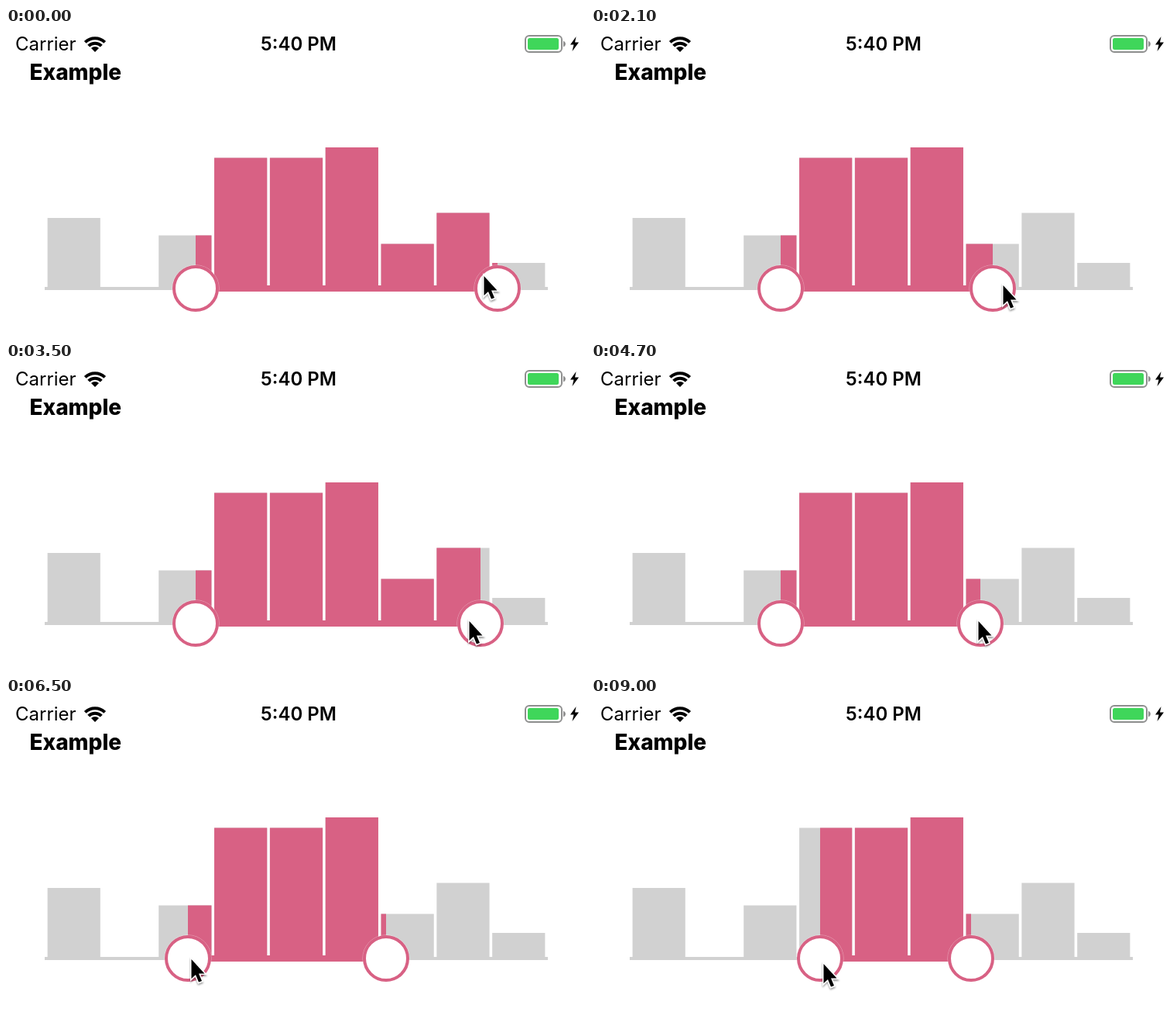
Animation, 748 px wide and 396 px high, one loop 9.1 s. Source, as an HTML page:

```html
<!DOCTYPE html>
<html lang="en">
<head>
<meta charset="utf-8">
<title>Range slider with histogram</title>
<style>
  html, body { margin: 0; width: 100%; height: 100%; overflow: hidden; background: #fff; }
  svg { display: block; width: 100vw; height: 100vh; }
  text { font-family: Inter, "Liberation Sans", sans-serif; fill: #000; }
</style>
</head>
<body>
<svg viewBox="0 0 748 396">
  <defs>
    <clipPath id="range"><rect id="window" y="100" height="260"/></clipPath>
    <filter id="shadow" x="-50%" y="-50%" width="200%" height="200%">
      <feDropShadow dx="0" dy="2" stdDeviation="1.3" flood-color="#000" flood-opacity=".4"/>
    </filter>
    <g id="handle">
      <circle r="30.2" fill="none" stroke="#fff" stroke-opacity=".45" stroke-width=".8"/>
      <circle r="28" fill="#fff" stroke="#d86184" stroke-width="4"/>
    </g>
  </defs>

  <!-- status bar -->
  <text x="12" y="29" font-size="24">Carrier</text>
  <g fill="none" stroke="#000" stroke-width="4">
    <path d="M102.3 18.4A18 18 0 0 1 127.7 18.4"/>
    <path d="M106.7 23.2A11.6 11.6 0 0 1 123.3 23.2"/>
  </g>
  <path d="M115 31L110 26A7 7 0 0 1 120 26Z"/>
  <text x="378" y="29" font-size="24" font-weight="600" text-anchor="middle">5:40 PM</text>
  <rect x="671" y="10" width="47" height="21" rx="5" fill="none" stroke="#8e8e8e" stroke-width="2"/>
  <rect x="674" y="13" width="40" height="15" rx="2.5" fill="#3fd65a"/>
  <path d="M720 16.5Q723 18 723 20.5T720 24.5Z" fill="#8e8e8e"/>
  <path d="M736.5 11L729 21.5H733.5L731.5 30L740 18.5H735Z"/>
  <text x="30.5" y="67" font-size="28" font-weight="800">Example</text>

  <!-- histogram and slider -->
  <path id="bars" fill="#d1d1d1"/>
  <rect x="50" y="334" width="650" height="4" fill="#d1d1d1"/>
  <g clip-path="url(#range)" fill="#d86184">
    <path id="active"/>
    <rect x="50" y="332" width="650" height="8"/>
  </g>
  <use id="low" href="#handle"/>
  <use id="high" href="#handle"/>
  <g id="cursor">
    <path transform="translate(.5 2)" d="M0 0V25L5.5 20L9.5 29.5L13.5 28L9.500 18.500H17Z"
      stroke="#fff" stroke-width="3" paint-order="stroke" filter="url(#shadow)"/>
  </g>
</svg>
<script>
const LOOP = 9100, STEP = 100, LAG = 50;
const LEFT = 50, RIGHT = 700, BASE = 336, GAP = 3.61;
const tops = [245, BASE, 267.4, 167.4, 167.4, 154, 278.4, 238.4, 303];

const linear = u => u;
const smooth = u => u * u * (3 - 2 * u);
const power = p => u => u ** p;

// Stops of the pointer: time, x, y and the easing used to get there.
const stops = [
  [0, 617, 318],
  [500, 624, 329, smooth],
  [600, 624, 329, linear],
  [1650, 433, 330, power(1.28)],
  [2600, 720, 330, power(1.43)],
  [3000, 720, 331, linear],
  [3900, 500, 331, linear],
  [4700, 500, 331, linear],
  [4950, 488, 331, smooth],
  [5600, 249, 333, smooth],
  [6100, 249, 334, linear],
  [6450, 239, 335, smooth],
  [6700, 239, 335, linear],
  [7200, 19, 341, smooth],
  [7760, 300, 341, smooth]
];

const el = id => document.getElementById(id);
const clamp = (v, min, max) => Math.min(max, Math.max(min, v));

function move(id, x, y) {
  el(id).setAttribute("transform", `translate(${Math.round(x)} ${Math.round(y)})`);
}

function pointer(t) {
  const next = stops.findIndex(stop => stop[0] > t);
  if (next < 0) return stops[stops.length - 1].slice(1, 3);
  const [t0, x0, y0] = stops[next - 1];
  const [t1, x1, y1, ease] = stops[next];
  const k = ease((t - t0) / (t1 - t0));
  return [x0 + (x1 - x0) * k, y0 + (y1 - y0) * k];
}

// A handle trails the pointer while it is held and rests outside that span.
function dragged(t, grab, release, grip) {
  const [x] = pointer(clamp(t - LAG, grab, release));
  return Math.round(clamp(x + grip, LEFT, RIGHT));
}

function render(time) {
  const t = Math.floor(time % LOOP / STEP) * STEP;
  const low = dragged(t, 6100, LOOP, -4);
  const high = t > 600 ? dragged(t, 600, 4950, 3) : 635;
  el("window").setAttribute("x", low);
  el("window").setAttribute("width", high - low);
  move("low", low, BASE);
  move("high", high, BASE);
  move("cursor", ...pointer(t));
}

const pitch = (RIGHT - LEFT - GAP) / tops.length;
const width = pitch - GAP;
const shape = tops.map((top, i) =>
  `M${LEFT + GAP + pitch * i} ${top}h${width}V${BASE}h${-width}Z`).join("");
el("bars").setAttribute("d", shape);
el("active").setAttribute("d", shape);

const start = performance.now();
function tick() {
  render(performance.now() - start);
  requestAnimationFrame(tick);
}
tick();
</script>
</body>
</html>
```
